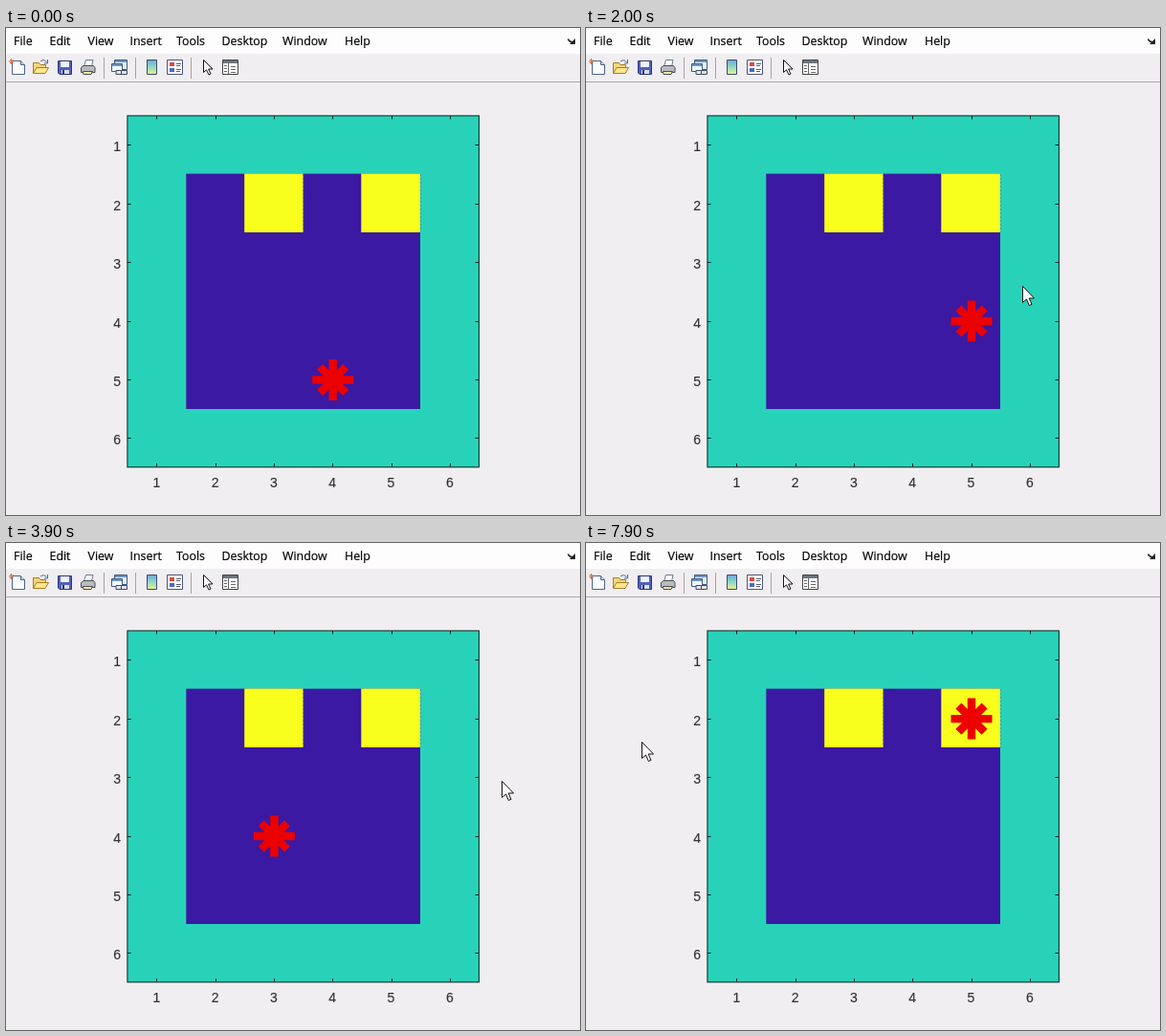
Write an HTML page that moves like this. It is 600 by 510 pixels and loops after 8 s.

```html
<!DOCTYPE html>
<html lang="en">
<meta charset="utf-8">
<title>Grid walk</title>
<style>
html, body { margin: 0; width: 100%; height: 100%; overflow: hidden; background: #f0eef1 }
svg { display: block; width: 600px; height: 510px }
.menu { font: 12.4px "Open Sans", sans-serif; fill: #000; stroke: #000; stroke-width: .2 }
.axis { font: 14px "Liberation Sans", Arial, sans-serif; fill: #333; stroke: #333; stroke-width: .15 }
</style>
<svg viewBox="0 0 600 510">
  <rect width="600" height="27" fill="#fefdfe"/>
  <path d="M0 56.5H600" stroke="#a8a6a9"/>
  <g id="menu" class="menu"></g>
  <path d="M587.500 11.500q1 3 5 3.500" fill="none" stroke="#222" stroke-width="1.5"/>
  <path d="M595 11V17H589Z" fill="#222"/>
  <path d="M102.500 31V53M135.500 31V53M193.500 31V53" stroke="#a5a3a8"/>

  <!-- toolbar -->
  <g stroke-width="1">
    <path d="M6.500 34.500H15.500L19.500 38.500V48.500H6.500Z" fill="#fafcff" stroke="#4d648a"/>
    <path d="M15.500 34.500V38.500H19.500" fill="#c5d6ea" stroke="#4d648a"/>
    <path d="M3 35H8M5.500 32V38M4 33L7.500 37M7.500 33L4 37" stroke="#dd7744"/>

    <path d="M28.500 47.500V36.500H34.500L36 38.500H41.500V41" fill="#f3d57a" stroke="#a87d28"/>
    <path d="M28.500 47.500L32 41.500H44.500L41 47.500Z" fill="#ffe68e" stroke="#a87d28"/>
    <path d="M36 35Q40 32 42.500 36M43.500 33V37H40" fill="none" stroke="#486c9e"/>

    <path d="M54.500 34.500H68.500V48.500H56L54.500 47Z" fill="#5360b8" stroke="#2a3480"/>
    <path d="M57 35H66V41H57Z" fill="#eef3fb"/>
    <path d="M58 44H66V48H58Z" fill="#d8dcee"/>
    <path d="M59 44H61V48H59Z" fill="#2d3670"/>

    <path d="M81.500 40.500L83.500 33.500H91L89.500 40.500Z" fill="#fff" stroke="#6d7a92"/>
    <path d="M78.500 41.500L81 39.500H91.500L93 41.500V46.500H78.500Z" fill="#b9bbc1" stroke="#4c4e56"/>
    <path d="M80.500 45.500H90.500L89 48.500H81Z" fill="#f4e7a9" stroke="#4c4e56"/>

    <path d="M113.500 33.500H126.500V43.500H113.500Z" fill="#e8f2fb" stroke="#3d5a80"/>
    <path d="M114 34H126V36H114Z" fill="#6d96c9"/>
    <path d="M110.500 37.500H121.500V45.500H110.500Z" fill="#f4f8fc" stroke="#3d5a80"/>
    <path d="M111 38H121V40H111Z" fill="#6d96c9"/>
    <path d="M115 44.500H120.500V48.500H115ZM120.500 44.500H126.500V48.500H120.500Z" fill="#dfe5ed" stroke="#3f4c60"/>

    <linearGradient id="bar" x2="0" y2="1">
      <stop stop-color="#70a5dd"/><stop offset=".5" stop-color="#8bdcc0"/><stop offset="1" stop-color="#f4ec92"/>
    </linearGradient>
    <path d="M147.500 33.500H157.500V48.500H147.500Z" fill="url(#bar)" stroke="#3c4b72"/>

    <path d="M168.500 33.500H184.500V48.500H168.500Z" fill="#fff" stroke="#4a5578"/>
    <path d="M171 36H176V40H171Z" fill="#d84b45"/>
    <path d="M171 42H176V46H171Z" fill="#4c69c8"/>
    <path d="M178 37.500H183M178 39.500H182M178 43.500H183M178 45.500H182" stroke="#555d73"/>

    <path d="M206.500 33.500V46.500L209.500 43.800L212 49L214 48L211.600 43H216Z" fill="#fff" stroke="#111"/>

    <path d="M226.500 33.500H242.500V48.500H226.500Z" fill="#fff" stroke="#444"/>
    <path d="M227 34H242V37H227Z" fill="#6b7280"/>
    <path d="M232.500 37V48M228 39.500H231M228 42.500H231M228 45.500H231M235 40.500H240M235 43.500H240M235 46.500H240" stroke="#666"/>
  </g>

  <!-- plot -->
  <rect x="127" y="92" width="367.500" height="368" fill="#28d2b9"/>
  <rect x="188.300" y="152.600" width="244.700" height="246.400" fill="#3b19a2"/>
  <path d="M249.200 152.600H310.600V214H249.200ZM371.300 152.600H433V214H371.300Z" fill="#f9ff1d"/>
  <path d="M433.300 153V214M310.700 153V214" stroke="#4a78b0" stroke-width=".7" stroke-dasharray="2 2"/>
  <rect x="126.900" y="91.900" width="367.500" height="368" fill="none" stroke="#06201c"/>
  <path id="ticks" stroke="#06201c"/>
  <g id="labels" class="axis"></g>

  <path id="star" d="M0-21.500V21.500M-21.500 0H21.500M-13.600-13.600L13.600 13.600M-13.600 13.600L13.600-13.600" stroke="#ec0000" stroke-width="8.400"/>
  <path id="cursor" d="M.5 .5V17.500L4.500 14L7.300 20.500L10 19.400L7.200 13H12.500Z" fill="#fff" stroke="#111"/>
</svg>
<script>
const $ = id => document.getElementById(id);
const text = (x, y, s, anchor = 'start') => `<text x="${x}" y="${y}" text-anchor="${anchor}">${s}</text>`;

const menu = { File: 8, Edit: 45.5, View: 85.5, Insert: 129.5, Tools: 178, Desktop: 225.5, Window: 289, Help: 354 };
$('menu').innerHTML = Object.entries(menu).map(([s, x]) => text(x, 18, s)).join('');

const colX = c => 96.5 + 61.3 * c, rowY = r => 61.2 + 61.45 * r;
let ticks = '', labels = '';
for (let i = 1; i <= 6; i++) {
  const x = Math.floor(colX(i)) + .5, y = Math.floor(rowY(i)) + .5;
  ticks += `M${x} 92v3.500M${x} 459.500v-3.500M127 ${y}h3.500M494 ${y}h-3.500`;
  labels += text(colX(i) - .5, 481, i, 'middle') + text(120, rowY(i) + 6.5, i, 'end');
}
$('ticks').setAttribute('d', ticks);
$('labels').innerHTML = labels;

// star cells [column, row], one move per second
const cells = [[4, 5], [5, 5], [5, 4], [4, 4], [3, 4], [3, 3], [4, 3], [5, 3], [5, 2]];
// cursor paths: [ms, x, y]; hidden outside them
const paths = [
  [[500, 375, 303], [1000, 402, 292], [2000, 456, 270], [2700, 509, 252], [3200, 518, 249], [4500, 518, 249]],
  [[7000, 47, 204], [7100, 46, 206], [7200, 46, 206], [7400, 58, 208], [8000, 58, 208]]
];

function place(el, x, y) { el.setAttribute('transform', `translate(${x} ${y})`); }

function cursorAt(t) {
  const path = paths.find(p => t >= p[0][0] && t < p[p.length - 1][0]);
  if (!path) return null;
  const i = path.findIndex(k => k[0] > t), a = path[i - 1], b = path[i];
  const u = (t - a[0]) / (b[0] - a[0]);
  return [a[1] + (b[1] - a[1]) * u, a[2] + (b[2] - a[2]) * u];
}

function draw(now) {
  const t = Math.floor(now % 8000 / 100) * 100;
  const [c, r] = cells[Math.floor((t + 300) / 1000)];
  place($('star'), colX(c), rowY(r));
  const pos = cursorAt(t);
  $('cursor').style.display = pos ? '' : 'none';
  if (pos) place($('cursor'), ...pos.map(Math.round));
}

const start = performance.now();
function loop() {
  draw(performance.now() - start);
  requestAnimationFrame(loop);
}
loop();
</script>
</html>
```
